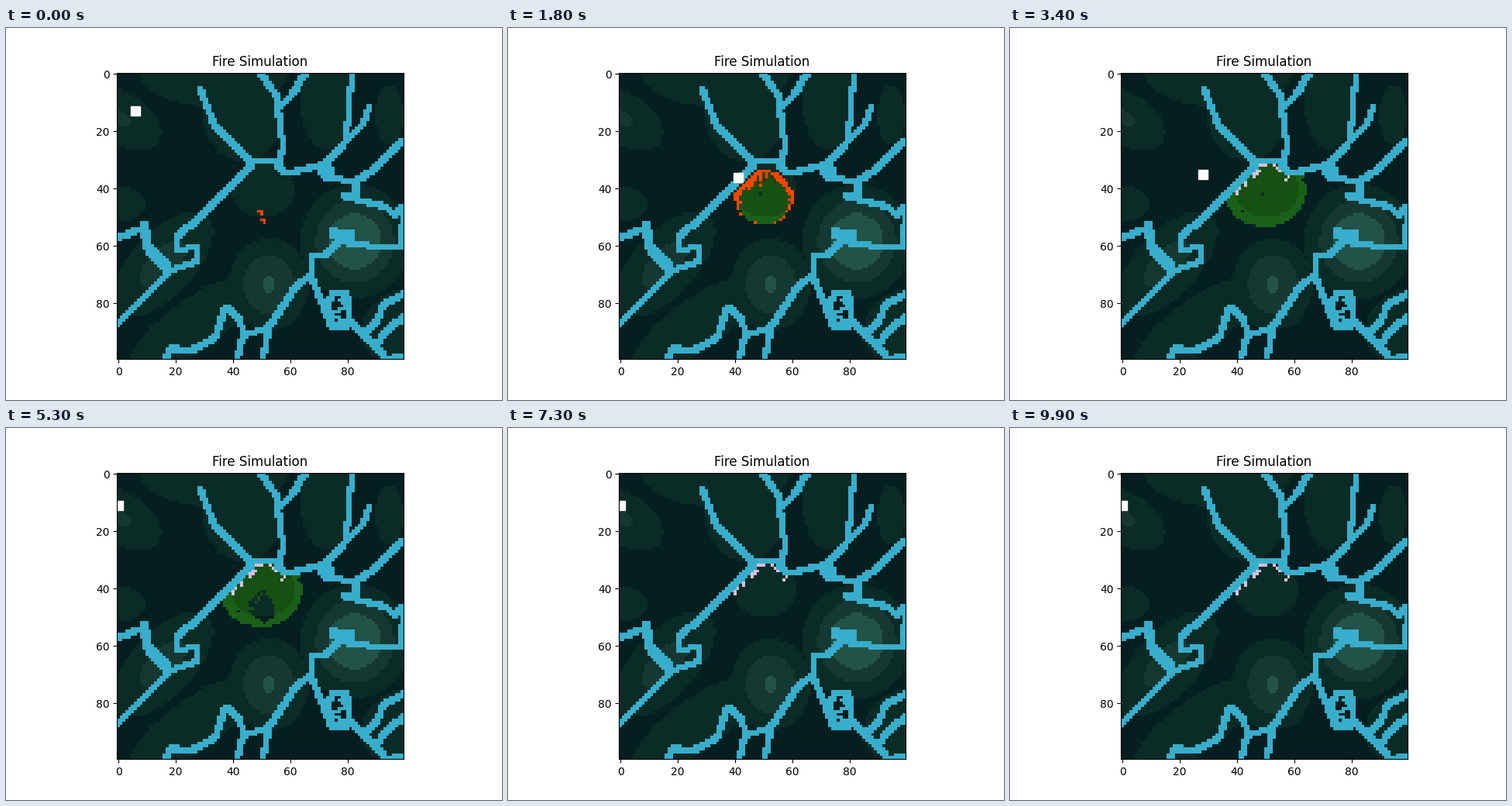
Recreate the animation shown at these times as a matplotlib script. Size 640 by 480 pixels, loop 10 s.

```python
import numpy as np
import matplotlib.pyplot as plt
from matplotlib.animation import FuncAnimation
from matplotlib.colors import to_rgb

N, FRAMES, INTERVAL = 100, 100, 100
FIRE_OUT, REGROW = 26, 44

LEVELS = np.array([to_rgb(c) for c in ("#051f20", "#0b2b26", "#163832", "#235347")])
BURNT = np.array([to_rgb(c) for c in ("#1b6018", "#165012", "#165012", "#165012")])
WATER, FIRE, EMBER, FOAM = map(to_rgb, ("#38aecc", "#ff4500", "#5a1a0c", "#d8bfd8"))

rng = np.random.default_rng(4)
rows, cols = np.mgrid[:N, :N]


def hill(x, y, rx, ry, tilt=0, peak=1.5):
    """Gaussian hill whose first contour is the tilted ellipse (rx, ry)."""
    a = np.radians(tilt)
    dx, dy = cols + 0.5 - x, rows + 0.5 - y
    u = (dx * np.cos(a) + dy * np.sin(a)) / rx
    v = (dy * np.cos(a) - dx * np.sin(a)) / ry
    return peak ** (1 - u * u - v * v)


def river(*points, width=2):
    """Drag a square brush along straight legs."""
    for a, b in zip(points, points[1:]):
        for s in np.linspace(0, 1, 80):
            x, y = (round(p + (q - p) * s - width / 2) for p, q in zip(a, b))
            water[max(y, 0):max(y + width, 0), max(x, 0):max(x + width, 0)] = True


def spread(mask):
    """The mask grown by one cell in the four main directions."""
    p = np.pad(mask, 1)
    return mask | p[:-2, 1:-1] | p[2:, 1:-1] | p[1:-1, :-2] | p[1:-1, 2:]


# Terrain
hills = [
    hill(1, 16, 16, 9, 30, 2.1),
    hill(34, 0, 26, 12),
    hill(44, 14, 14, 17),
    hill(73, 10, 9, 17),
    hill(95, 15, 5, 10),
    hill(51, 41, 11, 9.5),
    hill(2, 46, 8, 6),
    hill(16, 67, 23, 11, -47, 2.4),
    hill(27, 88, 26, 9, -35),
    hill(53, 74, 14, 16, 0, 3.1),
    hill(83, 59, 19, 20, 0, 4.2),
    hill(98, 88, 14, 11, -40),
]
height = np.clip(np.max(hills, axis=0), 0, 3).astype(int)

# Rivers
water = np.zeros((N, N), bool)
river((29, 6), (34, 18), (47, 31.5), (56, 31.5))
river((50, 0), (55.5, 8), (58, 26), (56, 33), (60, 35.5), (70, 32.5))
river((66, 0), (61, 8), (56, 13))
river((82, 0), (80, 24), (72, 33))
river((88, 12), (86, 18), (80, 24))
river((72, 33), (74, 36), width=4)
river((74, 37), (83, 38), (90, 34), (94, 29), (100, 24))
river((83, 38), (84, 42), (79.5, 43.5), (94, 47), (97, 50), (100, 46.5), (99, 61))
river((100, 61), (91, 61), (77, 59), (73, 63.5), (68, 64), (68, 71), (63, 74), (53, 89),
      (44, 92), (42, 100))
river((75, 56), (82, 57), width=3)
river((47, 32.5), (37, 42), (30, 50), (20.5, 57.5), (21, 62), (28, 61), (28, 66), (19, 69),
      (0, 88))
river((0, 58), (9, 54.5))
river((9.5, 54), (11, 61), (18, 68.5), width=3)
river((17, 100), (19, 96), (25, 97.5), (34, 93), (38, 82), (42, 85), (45, 92))
river((53, 89), (51, 100))
river((68, 72), (71, 79), (75, 89), (81, 87), (86, 91), (94, 100), (100, 99))
river((86, 92), (91, 86), (93, 81), (100, 77.5))
river((90, 96), (94, 90), (100, 85.5))
turn = np.linspace(0, 2 * np.pi, 13)
river(*zip(77.5 + 4 * np.cos(turn), 83 + 6.5 * np.sin(turn)))
river(*zip(rng.uniform(74, 81, 6), np.linspace(77, 89, 6)), width=1)

base = LEVELS[height]
base[water] = WATER
scorched = BURNT[height]

# Helicopter: time, column, row
ROUTE = [(0, 6, 13), (11, 28, 24), (18, 41, 36), (22, 49, 33), (25, 55, 37),
         (33, 31, 38), (34, 28, 35), (43, 1, 11)]


def heli(t):
    if t > 43:
        return 0, 11 if t % 2 else 9
    times, xs, ys = zip(*ROUTE)
    return round(np.interp(t, times, xs)), round(np.interp(t, times, ys))


def ignition():
    """Time each cell catches fire: random spread inside an ellipse drifting with the wind."""
    start = np.full((N, N), np.inf)
    for x, y in (49, 48), (50, 48), (50, 49), (50, 51), (51, 51), (51, 52):
        start[y, x] = 0
    fuel = ~water & (rng.random((N, N)) > 0.012)
    for t in range(1, FIRE_OUT + 1):
        lit = np.isfinite(start)
        dx = (cols - 51 + 0.05 * t) / (0.5 + 0.54 * t)
        dy = (rows - 49 + 0.33 * t) / (2.2 + 0.42 * t)
        catch = spread(lit) & ~lit & fuel & (np.hypot(dx, dy) <= 1)
        start[catch & (rng.random((N, N)) < 0.8)] = t
    return start


start = ignition()
burn = rng.integers(2, 4, (N, N))
regrow = REGROW + rng.integers(0, 4, (N, N))
smoulders = rng.random((N, N)) < 0.12
foam = np.isfinite(start) & spread(spread(water)) & (rows < 44) & (cols < 59)
foam &= rng.random((N, N)) < 0.45


def scene(t):
    age = t - start
    img = base.copy()
    burnt = (age >= burn) & (age < regrow)
    img[burnt] = scorched[burnt]
    img[burnt & smoulders & (age < burn + 2)] = EMBER
    img[(age >= 0) & (age < burn)] = FIRE
    img[foam & (age >= burn) & (t > 18)] = FOAM
    return img


fig, ax = plt.subplots(figsize=(6.4, 4.8), dpi=100)
ax.set_title("Fire Simulation")
picture = ax.imshow(scene(0), interpolation="nearest")
ax.autoscale(False)
marker, = ax.plot(*[[v] for v in heli(0)], "s", color="white", markersize=8)


def update(t):
    x, y = heli(t)
    picture.set_data(scene(t))
    marker.set_data([x], [y])
    return picture, marker


anim = FuncAnimation(fig, update, frames=FRAMES, interval=INTERVAL, repeat=True, repeat_delay=0)
plt.show()
```
